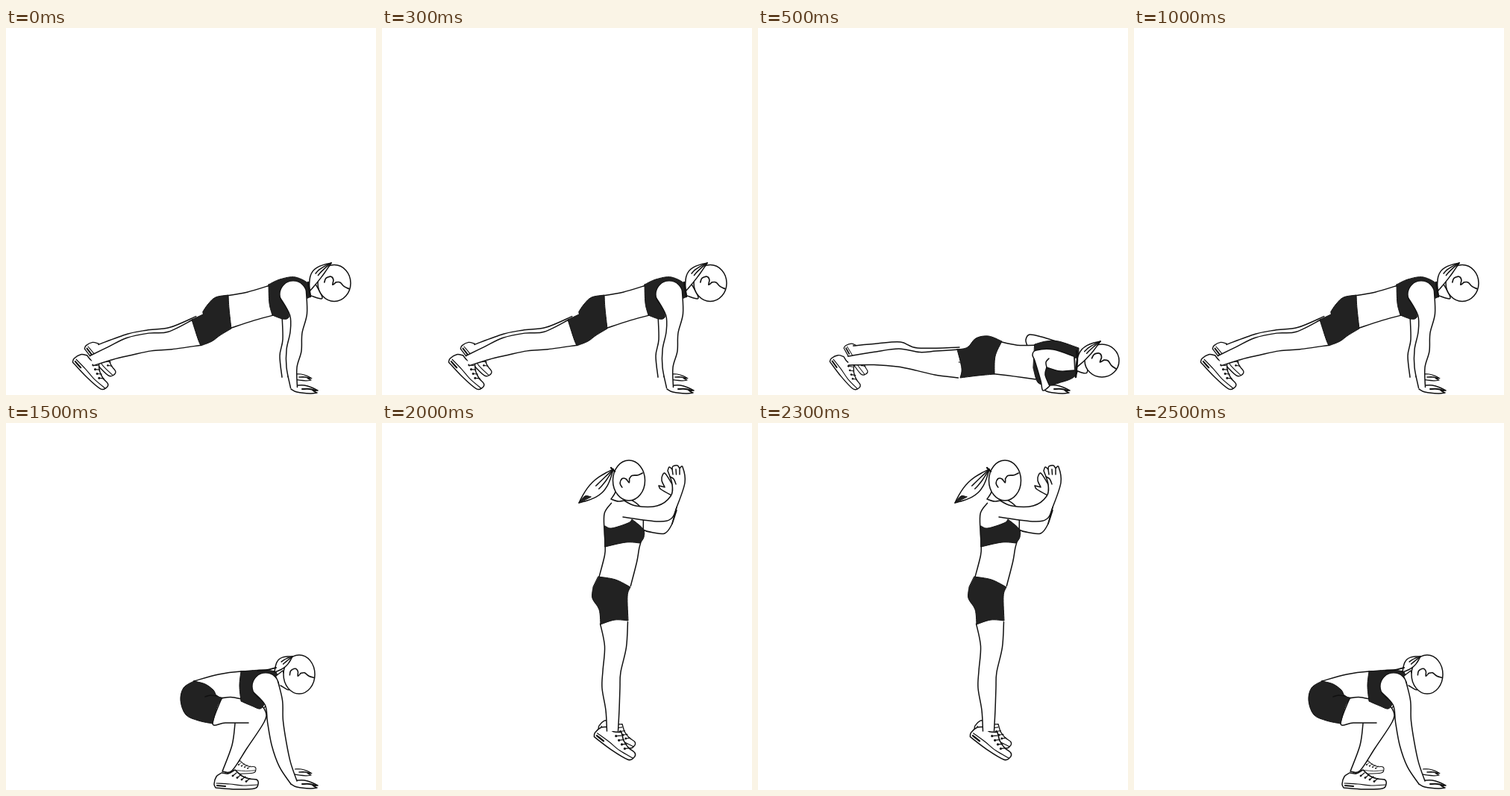
Recreate the animation shown at these times as an HTML page with a canvas. Size 496x492 px, loop 3000 ms.

```html
<!DOCTYPE html>
<html lang="en">
<head>
<meta charset="utf-8">
<title>Burpee</title>
<style>
html, body { margin: 0; width: 100%; height: 100%; overflow: hidden; background: #fff; }
canvas { display: block; }
</style>
</head>
<body>
<canvas id="stage" width="496" height="492"></canvas>
<script>
const ctx = document.getElementById('stage').getContext('2d');
const INK = '#111', CLOTH = '#222', SKIN = '#fff';
const STEP = 500;
const TAU = Math.PI * 2;

// Adds a smooth curve through [x, y] points to the current path.
function curve(p, join = ctx.lineTo) {
  join.call(ctx, ...p[0]);
  for (let i = 0; i < p.length - 1; i++) {
    const b = p[i], c = p[i + 1], a = p[i - 1] || b, d = p[i + 2] || c;
    ctx.bezierCurveTo(
      b[0] + (c[0] - a[0]) / 6, b[1] + (c[1] - a[1]) / 6,
      c[0] - (d[0] - b[0]) / 6, c[1] - (d[1] - b[1]) / 6, ...c);
  }
}

// "x,y x,y / x,y": smooth between points, with a sharp corner before each "/".
function trace(text) {
  ctx.beginPath();
  let last;
  for (const part of text.split('/')) {
    const p = part.trim().split(' ').map(xy => xy.split(',').map(Number));
    curve(last ? [last, ...p] : p, last ? ctx.lineTo : ctx.moveTo);
    last = p[p.length - 1];
  }
}

function paint(fill, width = 1.5) {
  if (fill) {
    ctx.fillStyle = fill;
    ctx.fill();
  }
  ctx.lineWidth = width;
  ctx.stroke();
}

function line(text, width) { trace(text); paint(null, width); }
function skin(text) { trace(text); paint(SKIN); }
function cloth(text) { trace(text); ctx.closePath(); paint(CLOTH, 1); }

// Tapered body part along [x, y, radius] joints, open at both ends.
function limb(...joints) {
  const side = sign => joints.map(([x, y, r], i) => {
    const [ax, ay] = joints[i - 1] || joints[i];
    const [bx, by] = joints[i + 1] || joints[i];
    const k = sign * r / Math.hypot(bx - ax, by - ay);
    return [x + (by - ay) * k, y - (bx - ax) * k];
  });
  const left = side(1), right = side(-1);
  ctx.beginPath();
  curve(left, ctx.moveTo);
  curve([...right].reverse());
  ctx.fillStyle = SKIN;
  ctx.fill();
  ctx.beginPath();
  curve(left, ctx.moveTo);
  curve(right, ctx.moveTo);
  paint();
}

// A limb that begins with a round shoulder.
function arm(...joints) {
  const [x, y, r] = joints[0];
  ctx.beginPath();
  ctx.arc(x, y, r, 0, TAU);
  paint(SKIN, 1.2);
  limb(...joints);
}

function place(x, y, angle, size, drawPart) {
  ctx.save();
  ctx.translate(x, y);
  ctx.rotate(angle);
  ctx.scale(size, size);
  drawPart();
  ctx.restore();
}

function hand(x, y, size) {
  place(x, y, 0, size, () => {
    skin('0,0 8,4 26,6 35,5 / 29,2 36,2 / 28,-2 18,-5 8,-5');
    line('15,0 25,0 33,2', 2);
  });
}

function hands() {
  hand(381, 468, 0.8);
  hand(382, 484, 1);
}

// Shoe with its sole running from heel to toe.
function shoe(heelX, heelY, toeX, toeY) {
  const dx = toeX - heelX, dy = toeY - heelY;
  place(heelX, heelY, Math.atan2(dy, dx), Math.hypot(dx, dy) / 58, () => {
    skin('1,-1 -1,-6 2,-16 9,-21 / 18,-20 27,-25 / 36,-17 46,-13 56,-12 58,-6 53,0 28,1 1,-1');
    line('2,-7 20,-6 38,-4 57,-5', 1.2);
    line('3,-4 14,-3', 2.2);
    for (let i = 0; i < 4; i++) {
      const x = 24 + i * 6, y = -17 + i * 2.5;
      line(`${x},${y} ${x + 5},${y - 4}`, 1.2);
      ctx.beginPath();
      ctx.arc(x, y, 1, 0, TAU);
      paint(INK, 1);
    }
  });
}

function head(x, y, rx, ry, turn) {
  ctx.beginPath();
  ctx.ellipse(x, y, rx, ry, 0, 0, TAU);
  paint(SKIN);
  place(x, y, turn, rx / 20, () =>
    line('18,7 12,4 7,-1 2,-1 / -2,2 -1,-4 -4,-8 -10,-6 -12,-1'));
}

// Lock of hair from tip to root, bulging by a different amount on each side.
function lock(tipX, tipY, rootX, rootY, outer, inner) {
  const dx = rootX - tipX, dy = rootY - tipY, len = Math.hypot(dx, dy);
  const strand = (bulge, from) => Array.from({ length: 7 }, (_, i) => {
    const t = from + (1 - from) * i / 6, off = bulge * Math.sin(Math.PI * t) / len;
    return [tipX + dx * t + dy * off, tipY + dy * t - dx * off];
  });
  ctx.beginPath();
  curve(strand(outer, 0), ctx.moveTo);
  curve(strand(inner, 0).reverse());
  paint(SKIN);
  for (const k of [0.35, 0.65]) {
    ctx.beginPath();
    curve(strand(inner + (outer - inner) * k, 0.5), ctx.moveTo);
    paint();
  }
}

function plank() {
  shoe(104, 430, 140, 469);
  limb([126, 431, 7], [165, 419, 9], [190, 414, 9], [222, 409, 8], [258, 395, 9]);
  shoe(88, 448, 130, 487);
  limb([115, 446, 7], [140, 436, 9], [165, 427, 12], [193, 421, 12], [220, 419, 12], [256, 408, 18]);
  limb([376, 385, 6], [378, 418, 7], [373, 440, 6], [374, 468, 4]);
  hands();
  limb([296, 381, 22], [328, 373, 19.5], [360, 364, 20]);
  cloth('264,380 271,370 281,361 298,358 / 299,376 302,403 / 287,412 276,420 261,426 / 257,416 249,391 / 264,384');
  cloth('352,344 367,337 388,334 408,345 409,360 / 381,374 379,388 371,390 357,385 / 353,369 352,344');
  arm([385, 357, 18], [392, 384, 11.5], [389, 408, 8], [386, 432, 10], [383, 455, 7], [386, 482, 4.5]);
  skin('407,351 413,340 / 424,362 409,359');
  head(440, 342, 22, 24.5, 0);
  lock(407, 353, 436, 315, 13, -1);
  line('405,341 408,360', 2.5);
}

function low() {
  shoe(114, 429, 140, 467);
  limb([128, 433, 7], [160, 431, 8], [190, 430, 9], [213, 438, 9], [270, 438, 10]);
  shoe(95, 447, 130, 487);
  limb([121, 446, 6], [155, 443, 8.5], [188, 442, 12], [215, 447, 12.5], [238, 449, 16], [269, 450, 19]);
  skin('361,426 359,418 364,411 380,414 402,421');
  limb([320, 442, 22], [345, 446, 21], [374, 448, 23]);
  cloth('267,431 281,428 292,416 309,413 327,420 / 318,440 317,464 / 295,466 271,469 / 273,456 267,431');
  cloth('371,424 386,420 403,420 430,429 / 427,464 403,476 387,479 / 375,475 369,456');
  hand(382, 484, 1);
  skin('424,459 405,460 387,455 / 385,465 391,480 / 382,486 379,473 371,446 368,438 373,432 396,431 423,440');
  line('387,455 386,448 390,443');
  skin('425,442 440,440 / 441,462 426,459');
  head(461, 446, 23, 22, 0.15);
  lock(426, 456, 459, 420, 11, -2);
  line('427,433 428,445 426,468', 2.5);
}

function squat() {
  shoe(296, 470, 335, 469);
  skin('252,346 285,337 315,333 340,333 / 348,376 342,383 / 315,371 280,368');
  shoe(280, 490, 338, 490);
  skin('307,403 303,432 290,467 / 303,466 323,436 346,401 348,387 338,377 306,368 289,369 / 277,403 294,402 325,402');
  cloth('252,346 238,355 234,372 241,391 258,399 277,403 / 283,380 290,369 / 282,365 278,358 267,350 252,346');
  line('267,367 274,365 283,366');
  cloth('315,333 344,331 362,333 / 365,350 348,374 / 341,383 329,379 315,373 / 313,352 315,333');
  hands();
  arm([348, 353, 18], [359, 375, 12], [361, 400, 10.5], [366, 430, 10], [374, 458, 8], [386, 482, 4.5]);
  skin('362,339 371,332 / 380,357 368,352');
  head(393, 337, 21, 26, -0.15);
  lock(360, 334, 384, 313, 9, -4);
  line('337,332 350,331 362,328', 2);
}

function jump() {
  shoe(289, 411, 335, 438);
  shoe(283, 421, 334, 454);
  limb([311, 268, 18.5], [313, 300, 14.5], [308, 333, 12], [307, 355, 12], [309, 385, 9], [309, 413, 7.5]);
  skin('340,132 350,143 364,147 379,148 388,137 395,117');
  limb([319, 104, 12], [323, 118, 25], [324, 145, 26], [322, 165, 23], [320, 182, 22], [312, 213, 22]);
  cloth('299,138 308,141 330,134 335,129 / 350,142 351,153 346,161 / 327,160 299,166');
  cloth('290,206 313,210 333,220 / 329,232 330,265 / 312,264 293,270 / 291,250 282,235 283,220');
  skin('390,98 374,89 371,84 / 379,86 / 375,77 376,70 380,68 390,84');
  skin('323,103 340,111 369,111 387,98 389,82 383,64 / 385,59 389,62 / 390,58 396,57 399,61 / 403,59 406,80 395,113 388,128 370,132 323,126');
  for (let i = 0; i < 3; i++) line(`${389 + i * 5},62 ${390 + i * 4.5},69`);
  line('386,72 391,75 394,82');
  line('395,113 389,135');
  skin('312,80 313,92 307,102 / 317,105 329,103 / 326,97');
  head(331, 77, 21.5, 27, -0.87);
  lock(264, 107, 310, 62, 7, -12);
  cloth('264,107 272,98 280,99');
  line('307,60 312,65', 2.4);
}

const sequence = [plank, low, plank, squat, jump, squat];

function draw(now) {
  ctx.fillStyle = '#fff';
  ctx.fillRect(0, 0, 496, 492);
  ctx.strokeStyle = INK;
  ctx.lineCap = ctx.lineJoin = 'round';
  sequence[Math.floor(now / STEP) % sequence.length]();
}

const start = performance.now();
function tick() {
  draw(performance.now() - start);
  requestAnimationFrame(tick);
}
tick();
</script>
</body>
</html>
```
